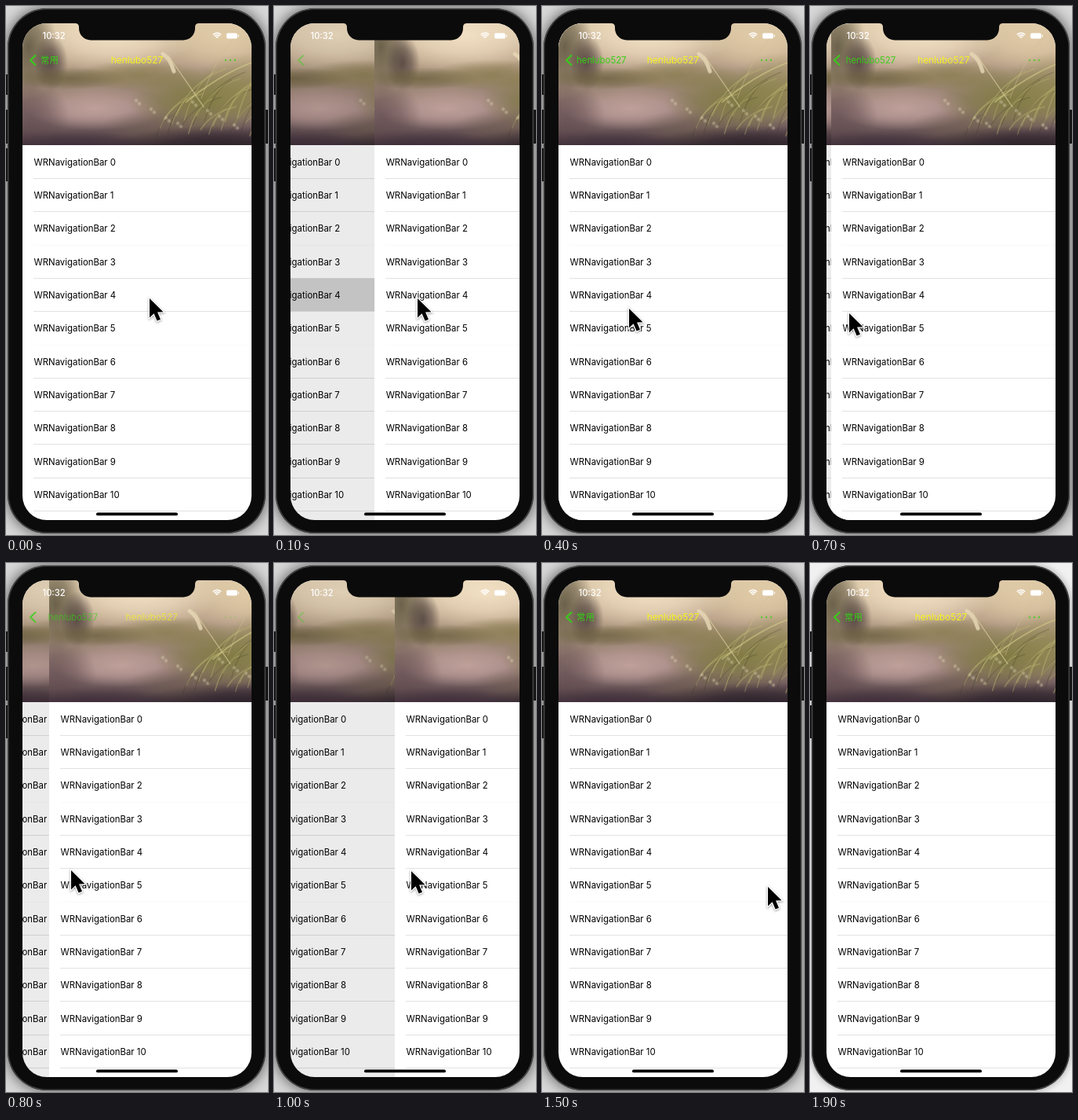
Recreate the animation shown at these times as an HTML page with a canvas. Size 334 px wide and 673 px high, loop 2 s.

```html
<!DOCTYPE html>
<html lang="zh">
<head>
<meta charset="utf-8">
<title>Navigation bar swipe</title>
<style>
  html, body { margin: 0; width: 100%; height: 100%; overflow: hidden; background: #ddd; }
  canvas { display: block; width: 334px; height: 673px; }
</style>
</head>
<body>
<canvas id="stage"></canvas>
<script>
const W = 334, H = 673, LOOP = 2000, STEP = 100;
const SCREEN = { x: 21, y: 22, w: 292, h: 632, r: 31 };
const HEADER = 155.3, ROW = 42.3;
const FONT = "Inter, 'Noto Sans CJK SC', 'Noto Sans CJK', sans-serif";
const NAME = "henlubo527", HOME = "常用";
const GREEN = "#35d016", YELLOW = "#f6f31c";
const dpr = window.devicePixelRatio || 1;

function makeContext(canvas, w, h) {
  canvas.width = Math.round(w * dpr);
  canvas.height = Math.round(h * dpr);
  const c = canvas.getContext("2d");
  c.scale(dpr, dpr);
  return c;
}
const ctx = makeContext(document.getElementById("stage"), W, H);

function roundRect(x, y, w, h, r) {
  ctx.beginPath();
  ctx.roundRect(x, y, w, h, r);
}

function box(x, y, w, h, color) {
  ctx.fillStyle = color;
  ctx.fillRect(x, y, w, h);
}

function text(str, x, y, color, { size = 11.4, weight = 400, align = "left" } = {}) {
  ctx.font = `${weight} ${size}px ${FONT}`;
  ctx.textAlign = align;
  ctx.textBaseline = "alphabetic";
  ctx.fillStyle = color;
  ctx.fillText(str, x, y);
}

// Soft meadow scene used as the header of every page
function paintMeadow() {
  const canvas = document.createElement("canvas");
  const c = makeContext(canvas, SCREEN.w, HEADER);
  const base = c.createLinearGradient(0, 0, 0, HEADER);
  [[0, "#d8c5a6"], [.3, "#bfa88e"], [.5, "#a08a78"], [.75, "#8f7675"], [1, "#43343b"]]
    .forEach(([at, color]) => base.addColorStop(at, color));
  c.fillStyle = base;
  c.fillRect(0, 0, SCREEN.w, HEADER);

  const glow = (x, y, rx, ry, rgb, alpha) => {
    c.save();
    c.translate(x, y);
    c.scale(rx, ry);
    const g = c.createRadialGradient(0, 0, 0, 0, 0, 1);
    g.addColorStop(0, `rgba(${rgb},${alpha})`);
    g.addColorStop(.5, `rgba(${rgb},${alpha * .65})`);
    g.addColorStop(1, `rgba(${rgb},0)`);
    c.fillStyle = g;
    c.fillRect(-1, -1, 2, 2);
    c.restore();
  };
  glow(115, 14, 105, 48, "244,226,198", .95);
  glow(255, 18, 75, 42, "228,206,168", .8);
  glow(8, 30, 36, 62, "92,84,62", .85);
  glow(36, 50, 22, 36, "80,66,62", .85);
  glow(60, 70, 75, 14, "104,94,58", .75);
  glow(150, 66, 80, 20, "132,120,72", .7);
  glow(92, 108, 90, 28, "196,164,158", .9);
  glow(10, 118, 50, 45, "92,70,74", .6);
  glow(230, 98, 95, 42, "126,122,62", .9);
  glow(280, 82, 55, 45, "146,138,78", .6);
  glow(170, 132, 70, 24, "116,98,80", .5);
  glow(250, 158, 140, 28, "42,32,40", .85);
  glow(60, 160, 110, 24, "62,44,58", .7);

  const blade = (x0, y0, cx, cy, x1, y1, color, width) => {
    c.strokeStyle = color;
    c.lineWidth = width;
    c.beginPath();
    c.moveTo(x0, y0);
    c.quadraticCurveTo(cx, cy, x1, y1);
    c.stroke();
  };
  c.lineCap = "round";
  for (let i = 0; i < 24; i++) {
    const x = 170 + i * 5.2, lean = 22 + (i * 37) % 48, rise = 28 + (i * 23) % 42;
    const y = 144 - (i * 11) % 28;
    const color = i % 3 ? "rgba(196,188,118,.42)" : "rgba(54,56,32,.5)";
    blade(x, y, x + lean * .3, y - rise * .75, x + lean, y - rise, color, .7 + i % 3 * .4);
  }
  blade(186, 41, 197, 57, 231, 106, "rgba(226,210,164,.75)", 1.2);
  blade(179, 39, 188, 44, 193, 61, "rgba(232,217,182,.8)", 5);
  blade(209, 100, 250, 66, 292, 50, "rgba(210,202,136,.75)", 1.4);
  blade(228, 95, 248, 40, 274, 14, "rgba(210,194,142,.55)", 1);
  for (let i = 0; i < 16; i++) {
    glow(145 + (i * 53) % 140, 98 + (i * 29) % 38, 3, 3, "226,216,180", .5);
  }
  return canvas;
}
const meadow = paintMeadow();

function page(left, selectedRow) {
  ctx.save();
  ctx.translate(SCREEN.x + left, SCREEN.y);
  box(0, 0, SCREEN.w, SCREEN.h, "#fff");
  ctx.drawImage(meadow, 0, 0, SCREEN.w, HEADER);
  for (let i = 0; i < 12; i++) {
    const top = HEADER + i * ROW;
    if (i === selectedRow) box(0, top, SCREEN.w, ROW, "#d4d4d4");
    text(`WRNavigationBar ${i}`, 14.5, top + 25.5, "#000");
    // Some hairlines fall between pixels and almost vanish
    const faint = i === 2 || i === 5;
    box(14, Math.round(top + ROW - .6), SCREEN.w - 14, 1, faint ? "#fafafa" : "#e2e2e2");
  }
  ctx.restore();
}

function navItems(label, labelShift, titleShift, alpha) {
  if (alpha <= 0) return;
  ctx.globalAlpha = alpha;
  text(label, 44 + labelShift, 73, GREEN);
  text(NAME, 167 + titleShift, 73, YELLOW, { size: 11.9, align: "center" });
  ctx.globalAlpha = 1;
}

function chevronAndDots(chevronAlpha, dotsAlpha) {
  ctx.globalAlpha = chevronAlpha;
  ctx.strokeStyle = GREEN;
  ctx.lineWidth = 1.9;
  ctx.lineCap = "butt";
  ctx.beginPath();
  ctx.moveTo(38, 62.5);
  ctx.lineTo(31, 69);
  ctx.lineTo(38, 75.5);
  ctx.stroke();
  ctx.globalAlpha = dotsAlpha * .75;
  ctx.fillStyle = GREEN;
  for (let i = 0; i < 3; i++) {
    ctx.beginPath();
    ctx.arc(280 + i * 6, 69, 1.2, 0, 7);
    ctx.fill();
  }
  ctx.globalAlpha = 1;
}

function statusBar() {
  text("10:32", 46.5, 42, "#fff", { size: 11.2, weight: 500 });
  ctx.strokeStyle = "#fff";
  ctx.lineWidth = 1.6;
  for (const r of [2, 4.6, 7.2]) {
    ctx.beginPath();
    ctx.arc(269, 41.5, r, -Math.PI * .76, -Math.PI * .24);
    ctx.stroke();
  }
  ctx.fillStyle = "#fff";
  roundRect(281, 34.5, 14, 7, 2);
  ctx.fill();
  box(296, 36.8, 1, 2.6, "#fff");
}

function backdrop(bright) {
  box(0, 0, W, H, bright ? "#f1f1f1" : "#d8d8d8");
  ctx.save();
  ctx.shadowColor = bright ? "rgba(0,0,0,.35)" : "rgba(0,0,0,.65)";
  ctx.shadowBlur = (bright ? 10 : 18) * dpr;
  ctx.fillStyle = "#111";
  roundRect(2, 3, 329, 668, 50);
  ctx.fill();
  ctx.restore();
}

function phoneBody() {
  for (const [y, h] of [[87, 26], [132, 43], [181, 42]]) box(0, y, 3, h, "#161616");
  box(330, 132, 4, 43, "#161616");
  roundRect(2, 3, 329, 668, 50);
  ctx.fillStyle = "#444";
  ctx.fill();
  roundRect(3.5, 4.5, 326, 665, 48.5);
  ctx.fillStyle = "#0b0b0b";
  ctx.fill();
}

function notch() {
  ctx.fillStyle = "#0b0b0b";
  ctx.beginPath();
  ctx.moveTo(88, 21);
  ctx.lineTo(88, 22);
  ctx.quadraticCurveTo(93, 22, 93, 27);
  ctx.arcTo(93, 43.5, 109, 43.5, 15);
  ctx.arcTo(241, 43.5, 241, 27, 15);
  ctx.lineTo(241, 27);
  ctx.quadraticCurveTo(241, 22, 246, 22);
  ctx.lineTo(246, 21);
  ctx.fill();
}

function cursor(x, y) {
  ctx.save();
  ctx.translate(x, y);
  ctx.beginPath();
  [[0, 0], [0, 24.5], [5.6, 19.2], [9.6, 28.6], [14, 26.7], [10.1, 17.6], [17.5, 17.2]]
    .forEach(([px, py]) => ctx.lineTo(px, py));
  ctx.closePath();
  ctx.lineJoin = "miter";
  ctx.shadowColor = "rgba(0,0,0,.4)";
  ctx.shadowBlur = 3 * dpr;
  ctx.shadowOffsetY = dpr;
  ctx.strokeStyle = "#fff";
  ctx.lineWidth = 2.4;
  ctx.stroke();
  ctx.shadowColor = "transparent";
  ctx.fillStyle = "#000";
  ctx.fill();
  ctx.restore();
}

// Linear interpolation over [time, value] pairs
function track(keys, t) {
  const next = keys.findIndex(([at]) => at > t);
  if (next < 0) return keys[keys.length - 1][1];
  if (next === 0) return keys[0][1];
  const [t0, v0] = keys[next - 1], [t1, v1] = keys[next];
  return v0 + (v1 - v0) * (t - t0) / (t1 - t0);
}

const cursorX = [[200, 183], [300, 150], [400, 111], [600, 42], [700, 50], [800, 83],
  [1000, 175], [1200, 270], [1300, 284], [1400, 288]];
const cursorY = [[200, 372], [400, 385], [600, 391], [800, 391], [1000, 392],
  [1200, 407], [1300, 411], [1400, 412]];
const dragX = [[600, 0], [700, 6], [800, 34], [900, 82], [1000, 133], [1100, 225], [1200, 292]];

// Left edge of the upper page: spring push, then a dragged pop
function upperPageX(t) {
  if (t < 400) {
    const k = t * .0215;
    return SCREEN.w * (1 + k) * Math.exp(-k);
  }
  return track(dragX, t);
}

function draw(t) {
  const x = upperPageX(t), rest = SCREEN.w - x;
  const pushing = t > 0 && t < 400, ended = t >= 1900;

  backdrop(ended);
  phoneBody();
  ctx.save();
  roundRect(SCREEN.x, SCREEN.y, SCREEN.w, SCREEN.h, SCREEN.r);
  ctx.clip();
  page(-.3 * rest, pushing ? 4 : -1);
  if (rest > 0) {
    box(SCREEN.x, SCREEN.y, x, SCREEN.h, "rgba(0,0,0,.08)");
    page(x, -1);
  }
  navItems(HOME, 0, -.3 * rest, (x - 150) / 142);
  navItems(NAME, x * .28, x * .55, 1 - x / 100);
  const settled = rest === 0;
  chevronAndDots(settled ? 1 : Math.max(.25, 1 - x / 200), settled ? 1 : Math.max(0, 1 - x / 45));
  statusBar();
  ctx.restore();

  notch();
  ctx.fillStyle = "#000";
  roundRect(115, 644.5, 104, 3.8, 1.9);
  ctx.fill();
  if (!ended) cursor(track(cursorX, t), track(cursorY, t));
}

function tick() {
  const t = performance.now() % LOOP;
  draw(Math.floor(t / STEP) * STEP);
  requestAnimationFrame(tick);
}
tick();
</script>
</body>
</html>
```
